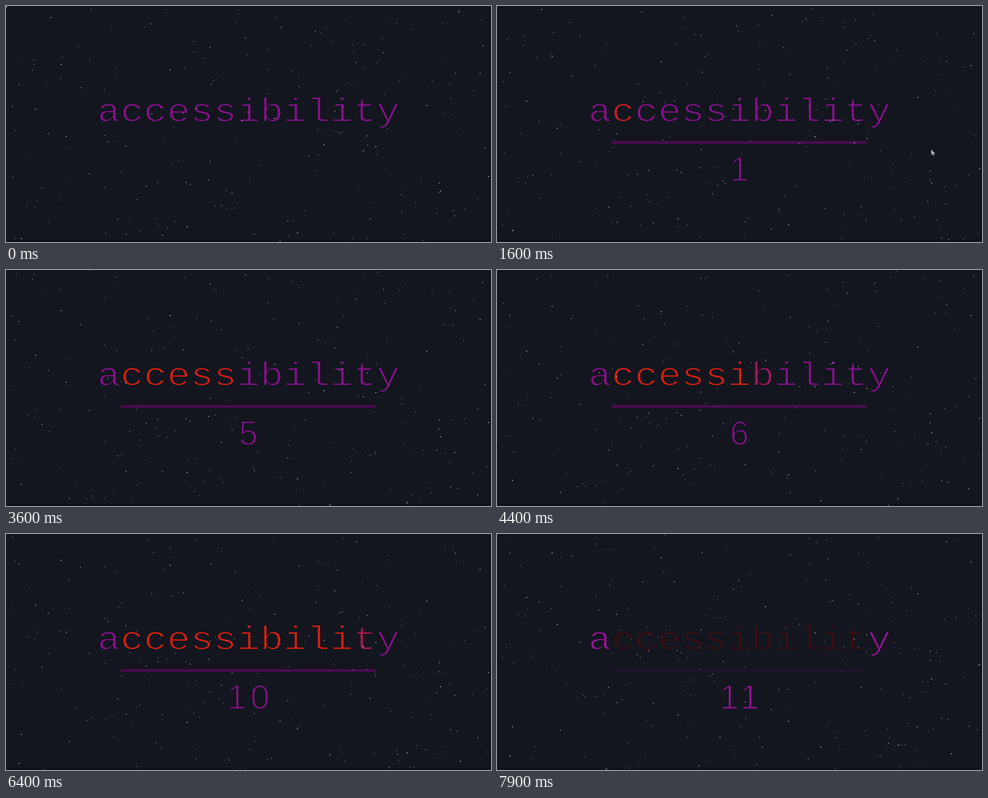
Animation, 1000 px wide and 487 px high, one loop 8 s. Source, as an HTML page:

```html
<!DOCTYPE html>
<html lang="en">
<head>
<meta charset="utf-8">
<title>accessibility</title>
<style>
  html, body { margin: 0; width: 100%; height: 100%; overflow: hidden; background: #13161f; }
  svg { display: block; width: 100vw; height: 100vh; }
  /* The background-coloured outline thins the letter strokes. */
  text { text-anchor: middle; stroke: #13161f; stroke-width: 2.5px; }
  #word { font: 80px "Liberation Mono", "Courier New", monospace; }
  #count { font: 71px "Liberation Sans", Arial, sans-serif; letter-spacing: 8.5px; }
</style>
</head>
<body>
<svg viewBox="0 0 1000 487">
  <rect width="1000" height="487" fill="#13161f"/>
  <path d="M996 0h4v487H0v-4h996z" fill="#0f121a"/>
  <text id="word" transform="translate(500 238) scale(1 .85)"></text>
  <rect id="line" x="236.5" y="279" width="525.5" height="5" rx="2" fill="#4f0a54"/>
  <text id="count" x="504" y="361"></text>
  <g id="sky"></g>
  <path id="cursor" d="M895.5 296v11.5l2.6-2.2 1.8 3.6 1.8-.9-1.7-3.5h3.4z" fill="#b4b6bc"/>
</svg>
<script>
const LOOP = 8000, TICK = 100, WIDTH = 1000, HEIGHT = 487;
const FIRST = 1300, STEP = 490, TINT = 400, COUNT_LAG = 210, FADE = 7400;
const PURPLE = [136, 16, 140], BRIGHT = [154, 19, 156], RED = [218, 31, 15], DARK = [28, 10, 18];
const WORD = "accessibility", INNER = WORD.length - 2;

const $ = id => document.getElementById(id);
const clamp = v => Math.max(0, Math.min(1, v));
const ramp = (t, from, to) => clamp((t - from) / (to - from));
const smooth = k => k * k * (3 - 2 * k);
const mix = (a, b, k) => a.map((v, i) => v + (b[i] - v) * k);
const rgb = c => `rgb(${c.map(Math.round)})`;

function add(parent, tag, attrs) {
  const el = document.createElementNS("http://www.w3.org/2000/svg", tag);
  for (const key in attrs) el.setAttribute(key, attrs[key]);
  return parent.appendChild(el);
}

let seed = 4217;
function random() {
  seed = (seed * 16807) % 2147483647;
  return seed / 2147483647;
}

// Star layers drift up: speed in px per second, count per screen.
function starLayer(speed, size, count) {
  const depth = HEIGHT + speed * LOOP / 1000;
  let d = "";
  for (let i = 0; i < count * depth / HEIGHT; i++) {
    d += `M${random() * WIDTH} ${random() * depth}h${size}v${size}h${-size}z`;
  }
  const el = add($("sky"), "path", { d, fill: "#dfe2e6", "fill-opacity": .8 });
  return { el, speed };
}

const layers = [starLayer(31.2, 1.3, 143), starLayer(15.6, 1.7, 45), starLayer(10.4, 2, 20)];

const letters = [...WORD].map(char => {
  const el = add($("word"), "tspan", {});
  el.textContent = char;
  return el;
});

function draw(t) {
  const gone = ramp(t, FADE, LOOP);
  const kept = rgb(mix(PURPLE, BRIGHT, gone));

  letters.forEach((el, i) => {
    if (i === 0 || i > INNER) return el.setAttribute("fill", kept);
    const start = FIRST + STEP * (i - 1);
    const tint = mix(PURPLE, RED, smooth(ramp(t, start, start + TINT)));
    el.setAttribute("fill", rgb(mix(tint, DARK, gone)));
  });

  $("line").setAttribute("opacity", ramp(t, 700, 1300) * (1 - gone));

  const n = Math.floor((t - FIRST - COUNT_LAG) / STEP) + 1;
  $("count").textContent = n > 0 ? Math.min(INNER, n) : "";
  $("count").setAttribute("fill", kept);

  for (const { el, speed } of layers) {
    el.setAttribute("transform", `translate(0 ${-speed * t / 1000})`);
  }
  $("cursor").setAttribute("visibility", t >= 1100 && t < 2000 ? "visible" : "hidden");
}

const begin = performance.now();
function frame() {
  const t = Math.max(0, performance.now() - begin) % LOOP;
  draw(Math.floor(t / TICK) * TICK);
  requestAnimationFrame(frame);
}
frame();
</script>
</body>
</html>
```
